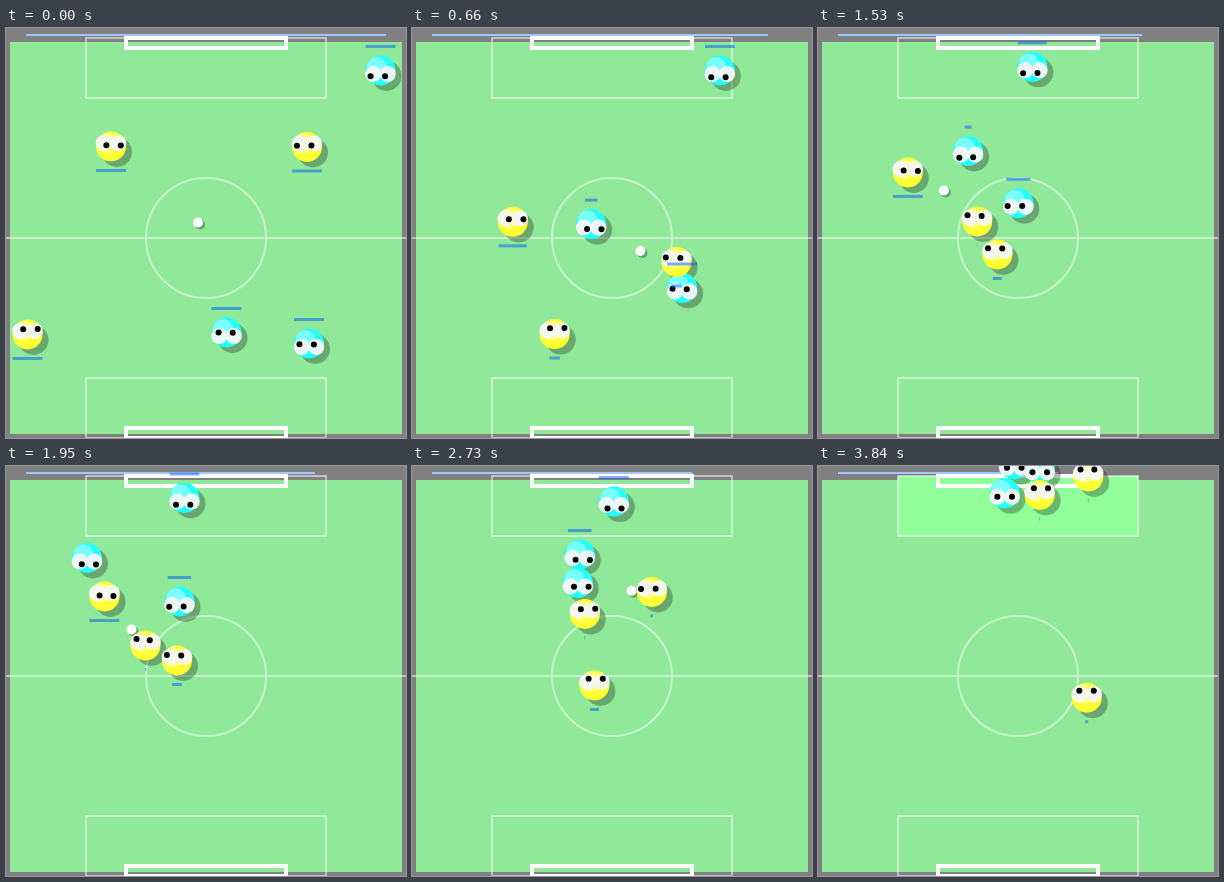
Write an HTML page with a canvas that moves like this. It is 400 px wide and 410 px high and loops after 3870 ms.

```html
<!DOCTYPE html>
<html>
<head>
<meta charset="utf-8">
<style>
html, body { margin: 0; width: 400px; height: 410px; overflow: hidden; background: #808080; }
canvas { display: block; }
</style>
</head>
<body>
<canvas id="stage" width="400" height="410"></canvas>
<script>
const ctx = document.getElementById('stage').getContext('2d');
const LOOP = 3870, STEP = 30, LEG = 650;

// Paths are a few points, one LEG of time apart
const cyan = (...path) => ({ color: '#2ff', side: 1, path });
const yellow = (...path) => ({ color: '#ff3', side: -1, path });

const players = [
  cyan([374.5, 42.5], [309, 42.5], [234, 42.5], [178.5, 32], [200, 42], [209, 10], [223, 2]),
  cyan([303, 315.5], [271, 261], [215, 197], [173.5, 135.5], [160, 103], [199, 30.5], [196, -5]),
  cyan([220.5, 304.5], [179, 197], [188, 140], [81, 92], [159, 131], [193, 60.5], [186, 24]),
  yellow([105, 118.5], [101, 194.5], [85, 152], [98.5, 130.5], [234, 144], [263, 53.5], [271, 6]),
  yellow([301, 119], [266, 234.5], [170, 201], [139.5, 179.5], [164, 163], [208, 87.5], [223, 23]),
  yellow([21.5, 306.5], [142, 307], [184, 244], [171, 194.5], [164, 216], [256, 233.5], [270, 231.5]),
];
const ballPath = [[192, 194.5], [230, 224], [126, 162], [125.5, 163.5], [215, 148], [238, 31.5], [257, -64]];

function at(path, t) {
  const leg = Math.floor(t / LEG), k = t / LEG - leg;
  const [a, b] = path.slice(leg);
  return { x: a[0] + (b[0] - a[0]) * k, y: a[1] + (b[1] - a[1]) * k };
}

// Sprinting drains energy, a slow run restores a little
function energyAt(path, t) {
  let energy = 30;
  for (let i = 0; i * LEG < t; i++) {
    const [a, b] = path.slice(i);
    const speed = Math.hypot(b[0] - a[0], b[1] - a[1]) / LEG * STEP;
    const rate = Math.min(0.05, 0.4 * (3.3 - speed));
    const steps = Math.min(LEG, t - i * LEG) / STEP;
    energy = Math.max(0, Math.min(30, energy + rate * steps));
  }
  return energy;
}

function disc(x, y, r, color) {
  ctx.fillStyle = color;
  ctx.beginPath();
  ctx.arc(x, y, r, 0, 7);
  ctx.fill();
}

function rect(x, y, w, h, color) {
  ctx.fillStyle = color;
  ctx.fillRect(x, y, w, h);
}

function drawField(t, goal) {
  rect(0, 0, 400, 410, '#808080');
  rect(4, 14, 392, 392, '#90e899');
  if (goal) rect(80, 10, 240, 60, '#90ff99');
  ctx.strokeStyle = 'rgba(255,255,255,.5)';
  ctx.lineWidth = 2;
  for (const y of [10, 350]) ctx.strokeRect(80, y, 240, 60);
  ctx.beginPath();
  ctx.moveTo(0, 210);
  ctx.lineTo(400, 210);
  ctx.moveTo(260, 210);
  ctx.arc(200, 210, 60, 0, 2 * Math.PI);
  ctx.stroke();
  ctx.strokeStyle = '#fff';
  ctx.lineWidth = 4;
  for (const y of [10, 400]) ctx.strokeRect(120, y, 160, 10);
  rect(20, 6, 360 - t * 0.0365, 2, '#a0c8ff');
}

function drawPlayer({ x, y, color, side }, ball, goal) {
  disc(x, y, 15, color);
  disc(x - 3.5, y - 3.5, 10, 'rgba(255,255,255,.4)');
  const eyeY = y + 3.5 * side;
  const eyes = [x - 7.3, x + 7.3];
  for (const eyeX of eyes) disc(eyeX, eyeY, 8, 'rgba(245,245,245,.95)');
  // Each pupil follows the ball; the beaten side stares ahead
  const reach = goal && side > 0 ? 0 : 3.5;
  for (const eyeX of eyes) {
    const look = Math.atan2(ball.y - eyeY, ball.x - eyeX);
    disc(eyeX + reach * Math.cos(look), eyeY + reach * Math.sin(look), 3, '#000');
  }
}

function draw(t) {
  const ball = at(ballPath, t);
  const goal = ball.y < 2;
  const team = players.map(p => ({ ...p, ...at(p.path, t) }));
  drawField(t, goal);
  for (const p of team) disc(p.x + 6, p.y + 5.5, 15, 'rgba(0,0,0,.28)');
  disc(ball.x + 2, ball.y + 2, 5, 'rgba(0,0,0,.3)');
  disc(ball.x, ball.y, 5, '#fff');
  for (const p of team) drawPlayer(p, ball, goal);
  for (const p of team) {
    const energy = energyAt(p.path, t);
    rect(p.x - energy / 2, p.y - 24 * p.side - 1.5, energy, 3, 'rgba(0,90,255,.5)');
  }
}

const start = performance.now();
function tick() {
  const t = (performance.now() - start) % LOOP;
  draw(Math.floor(t / STEP) * STEP);
  requestAnimationFrame(tick);
}
tick();
</script>
</body>
</html>
```
